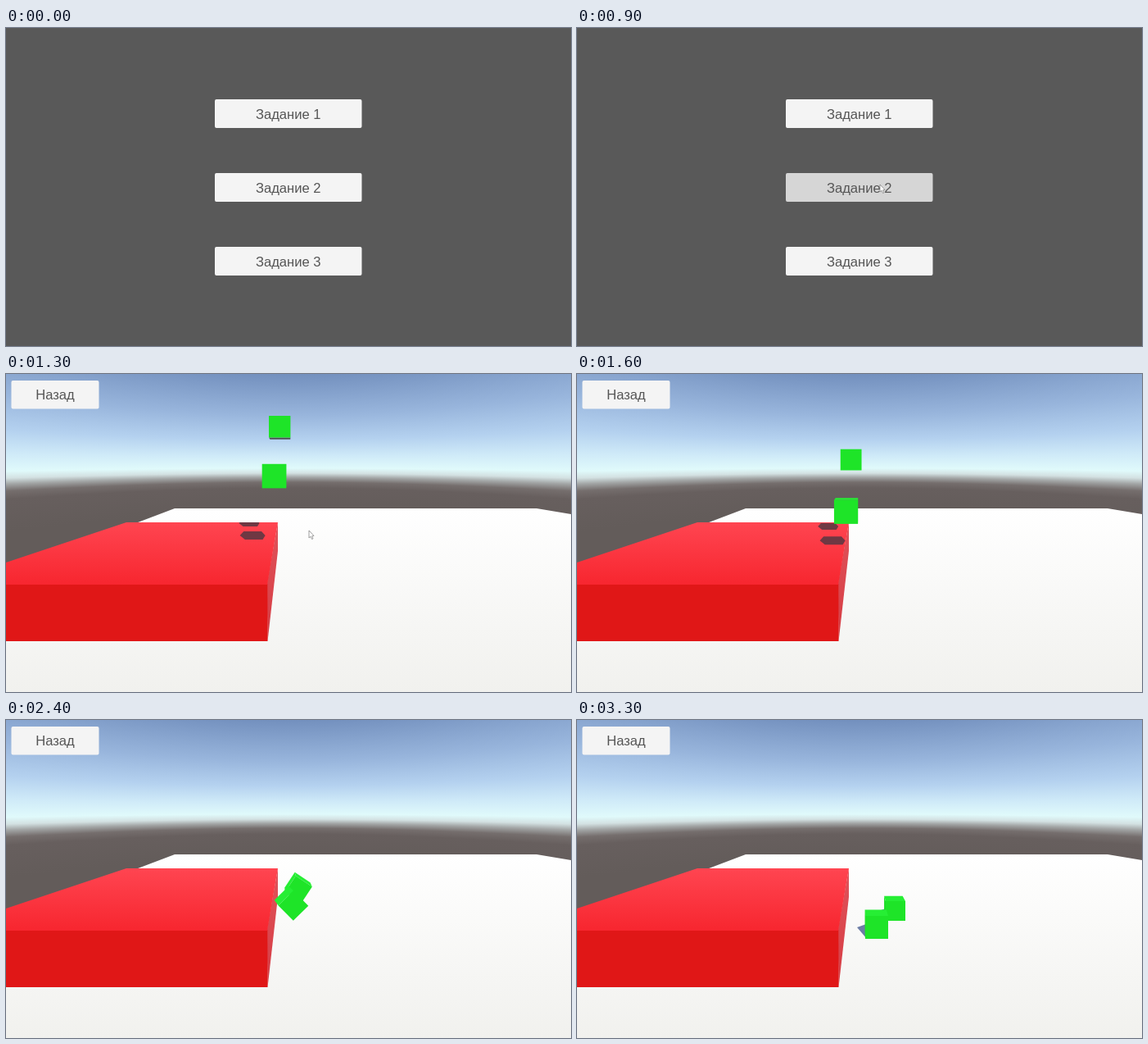
Recreate the animation shown at these times as an HTML page with a canvas. Size 690 by 388 pixels, loop 4000 ms.

```html
<!DOCTYPE html>
<html lang="ru">
<head>
<meta charset="utf-8">
<style>
  html, body { margin: 0; width: 100%; height: 100%; overflow: hidden; background: #595959; }
  canvas { display: block; }
</style>
</head>
<body>
<canvas id="stage" width="690" height="388"></canvas>
<script>
const W = 690, H = 388, LOOP = 4000, STEP = 100;
const SCENE_START = 1000, REST = 3200;
const ctx = document.getElementById('stage').getContext('2d');
const EYE = { x: 345, y: 115 };   // vanishing point of the cubes
const DEPTH = 0.06;               // perspective shrink from a cube's front to its back

const lerp = (a, b, u) => a + (b - a) * u;
const progress = (t, from, to) => Math.min(1, Math.max(0, (t - from) / (to - from)));

function poly(points, fill) {
  ctx.beginPath();
  points.forEach(([x, y]) => ctx.lineTo(x, y));
  ctx.closePath();
  ctx.fillStyle = fill;
  ctx.fill();
}

function shade(y0, y1, from, to) {
  const g = ctx.createLinearGradient(0, y0, 0, y1);
  g.addColorStop(0, from);
  g.addColorStop(1, to);
  return g;
}

// Sky bands follow equal elevation, so they bend away from the horizon at the sides.
function paintSky() {
  const sky = document.createElement('canvas');
  sky.width = W;
  sky.height = 240;
  const c = sky.getContext('2d');
  const horizon = 107, below = 60;
  const bands = [[-107, '#7390be'], [-57, '#98b5dc'], [-27, '#b4d1ef'], [-7, '#cfeaf8'], [8, '#e0fafb'],
                 [14, '#d3e1e2'], [19, '#a3a6a6'], [25, '#756e6d'], [32, '#675f5e'], [60, '#635c5a']];
  for (let x = 0; x < W; x++) {
    const bend = Math.hypot(1, (x - W / 2) / 336);
    const g = c.createLinearGradient(0, horizon * (1 - bend), 0, horizon + below * bend);
    bands.forEach(([d, color]) => g.addColorStop((d + horizon) / (horizon + below), color));
    c.fillStyle = g;
    c.fillRect(x, 0, 1, sky.height);
  }
  return sky;
}
const sky = paintSky();

function button(x, y, w, h, label, fill = '#f4f4f4') {
  ctx.beginPath();
  ctx.roundRect(x, y, w, h, 2);
  ctx.fillStyle = fill;
  ctx.fill();
  ctx.font = '16.6px "Liberation Sans", Arial, sans-serif';
  ctx.textAlign = 'center';
  ctx.fillStyle = '#565656';
  ctx.fillText(label, x + w / 2, y + h / 2 + 6);
}

function cursor(x, y) {
  const arrow = [[0, 0], [0, 9], [2, 7.3], [3.6, 10.5], [5, 9.8], [3.6, 6.8], [6, 6.4]];
  poly(arrow.map(([dx, dy]) => [x + dx, y + dy]), '#fff');
  ctx.strokeStyle = '#777';
  ctx.lineWidth = 0.7;
  ctx.stroke();
}

function menu(t) {
  ctx.fillStyle = '#595959';
  ctx.fillRect(0, 0, W, H);
  for (let i = 0; i < 3; i++) {
    const pressed = i === 1 && t >= 900;
    button(255, 87 + 90 * i, 179.5, 35, 'Задание ' + (i + 1), pressed ? '#d6d6d6' : undefined);
  }
  if (t >= 100) {
    const u = progress(t, 100, 500);
    cursor(lerp(611, 370, u), lerp(260, 191, u) - 100 * Math.sin(Math.PI * u));
  }
}

// Each cube drops from start to edge, then tips over the edge and rolls to rest.
const nearCube = {
  landing: 1700, start: [327, 104], edge: [329, 188], rest: [366, 253], size: [30, 28], yaw: 12,
  shadow: { start: [296, 194], edge: [317, 206], w: 31, h: 10 },
};
const farCube = {
  landing: 2000, start: [334, 43.5], edge: [335.5, 189], rest: [389, 233], size: [27, 24], yaw: 2,
  shadow: { start: [292, 180], edge: [327, 194], w: 25, h: 8 },
};

function pose(body, t) {
  const q = progress(t, SCENE_START, body.landing), u = progress(t, body.landing, REST);
  const fall = q * (0.25 + 0.75 * q);
  const slide = Math.sin(u * Math.PI / 2) ** 1.3;
  const turn = body.yaw * u * Math.sin(Math.PI * u);
  const [x, y] = [0, 1].map(i => u > 0 ? lerp(body.edge[i], body.rest[i], slide)
                                       : lerp(body.start[i], body.edge[i], fall));
  const size = lerp(...body.size, progress(t, SCENE_START, 2500)) - 0.4 * turn;
  return { x, y, u, fall, turn, size, roll: u ** 0.9 * Math.PI / 2 };
}

function cube({ x, y, size, roll, turn }) {
  const cos = Math.cos(roll) * size / 2, sin = Math.sin(roll) * size / 2;
  const front = [[-1, -1], [1, -1], [1, 1], [-1, 1]].map(([a, b]) => [x + a * cos - b * sin, y + a * sin + b * cos]);
  const back = front.map(([px, py]) => [lerp(px, EYE.x, DEPTH) - turn, lerp(py, EYE.y, DEPTH)]);
  front.forEach((a, i) => {
    const j = (i + 1) % 4, b = front[j];
    const nx = (b[1] - a[1]) / size, ny = (a[0] - b[0]) / size;
    const visible = (back[i][0] - a[0]) * nx + (back[i][1] - a[1]) * ny > 0;
    if (visible) poly([a, b, back[j], back[i]], ny < -0.3 ? '#26ee34' : ny > 0.5 ? '#4b544f' : '#1bdc28');
  });
  poly(front, '#1ee428');
}

function blockShadow({ start, edge, w, h }, { fall, u }) {
  const x = lerp(start[0], edge[0], fall), y = lerp(start[1], edge[1], fall);
  const width = w * Math.max(0, 1 - 3 * u);
  const outline = [[-.5, 0], [-.35, -.5], [.35, -.5], [.5, 0], [.4, .5], [-.3, .5]];
  poly(outline.map(([a, b]) => [x + a * width, y + b * h]), '#6f3843');
}

function floorShadow({ x, y, size, turn, u }) {
  if (u < 0.5) return;
  const k = size / 28;
  poly([[-24, 0], [-10, -5], [8, 14], [-12, 14]].map(([a, b]) => [x - turn + a * k, y + b * k]), '#6c7da6');
}

function block(near, far) {
  const top = [[147, 181], [332, 181], [319, 257], [0, 257], [0, 230]];
  poly([[332, 181], [332, 216], [319.5, 326], [318.5, 256]], shade(181, 326, '#e0535b', '#d63c43'));
  poly([[0, 256], [319.3, 256], [319.5, 326], [0, 326]], '#e01717');
  poly(top, shade(181, 257, '#ff4551', '#f7262f'));
  ctx.save();
  ctx.beginPath();
  top.forEach(p => ctx.lineTo(...p));
  ctx.clip();
  blockShadow(nearCube.shadow, near);
  blockShadow(farCube.shadow, far);
  ctx.restore();
}

function scene(t) {
  const near = pose(nearCube, t), far = pose(farCube, t);
  ctx.drawImage(sky, 0, 0);
  poly([[206, 164], [648, 164], [W, 171], [W, H], [0, H], [0, 242]], shade(164, H, '#ffffff', '#f1f1ee'));
  block(near, far);
  floorShadow(far);
  floorShadow(near);
  cube(far);
  cube(near);
  button(6.5, 8, 107, 34.5, 'Назад');
  if (t < 1500) cursor(370, 191);
}

const begin = performance.now();
function frame() {
  const elapsed = Math.max(0, performance.now() - begin) % LOOP;
  const t = Math.floor(elapsed / STEP) * STEP;
  (t < SCENE_START ? menu : scene)(t);
  requestAnimationFrame(frame);
}
frame();
</script>
</body>
</html>
```
